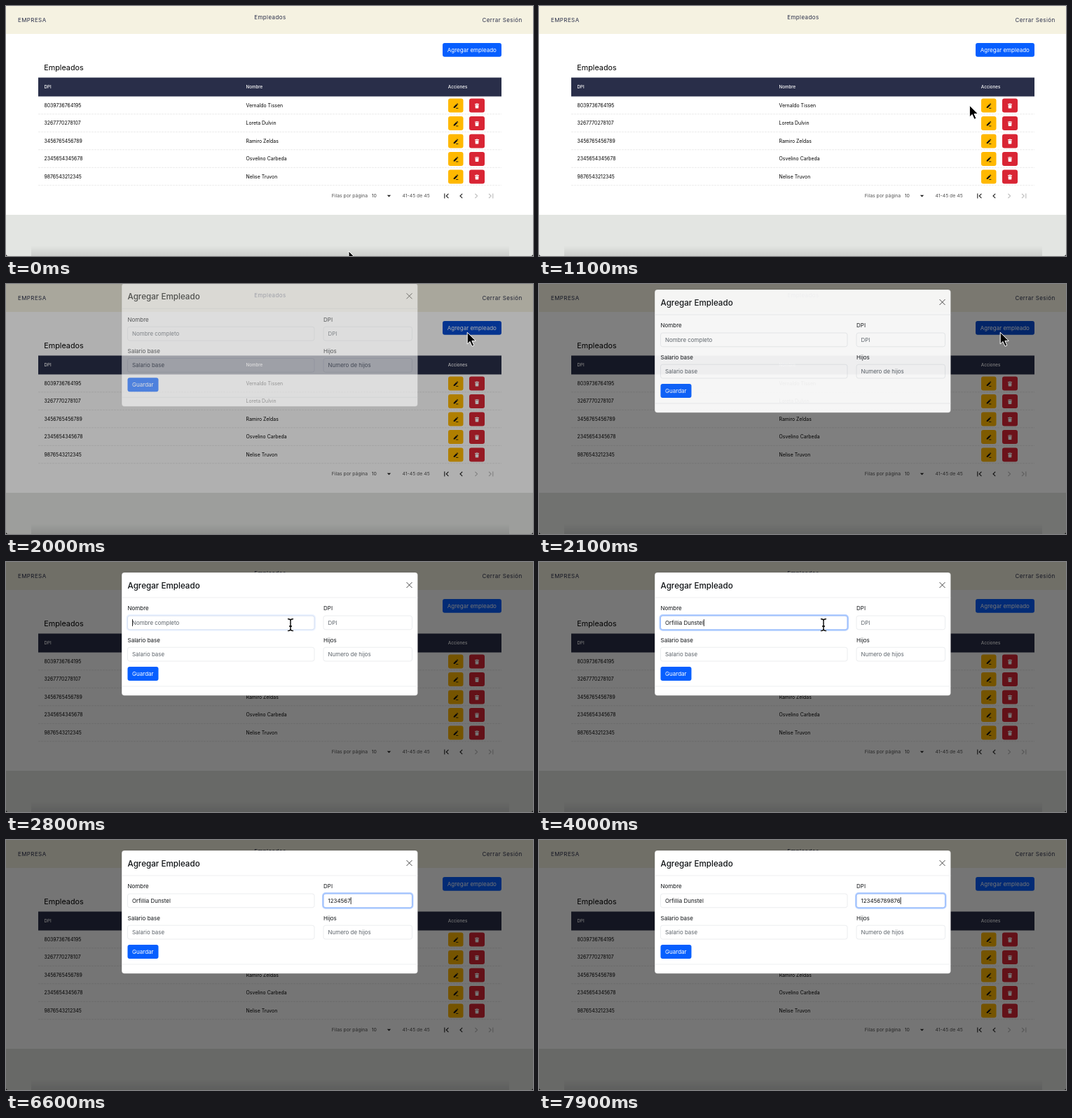
An HTML page for the animation above (8000 ms loop, 752 by 358 pixels).

```html
<!DOCTYPE html>
<html lang="es">
<head>
<meta charset="utf-8">
<title>Empleados</title>
<style>
  html, body { margin: 0; width: 100%; height: 100%; overflow: hidden; background: #fff; }
  svg { display: block; width: 752px; height: 358px; font-family: Inter, Roboto, sans-serif; }
  text { white-space: pre; }
</style>
</head>
<body>
<svg id="stage" viewBox="0 0 752 358"></svg>
<script>
const stage = document.getElementById('stage');
const LOOP = 8000;
const BLUE = '#075fff', INK = '#111417', HINT = '#5c636a';

// Text placed by its left edge and the middle of its capitals
const label = (x, y, str, size, fill = INK, extra = '') =>
  `<text x="${x}" y="${y + size * 0.36}" font-size="${size}" fill="${fill}" ${extra}>${str}</text>`;
const box = (x, y, w, h, fill, r = 0, extra = '') =>
  `<rect x="${x}" y="${y}" width="${w}" height="${h}" rx="${r}" fill="${fill}" ${extra}/>`;
const line = (d, stroke, width = 1, extra = '') =>
  `<path d="${d}" fill="none" stroke="${stroke}" stroke-width="${width}" ${extra}/>`;

const people = [
  ['8039736764195', 'Vernaldo Tissen'],
  ['3267770278107', 'Loreta Dulvin'],
  ['3456765456789', 'Ramiro Zeldas'],
  ['2345654345678', 'Osvelino Carbeda'],
  ['9876543212345', 'Nelise Truvon']
];

const row = ([dpi, name], i) => {
  const y = 142.5 + i * 25.5;
  return label(54.5, y, dpi, 6.9, '#000') + label(342.5, y, name, 6.9, '#000') +
    box(631, y - 10, 21.5, 20, '#ffb800', 3) + box(661, y - 10, 22, 20, '#d92534', 3) +
    `<g transform="translate(641.7 ${y + 0.5})">
      <path d="M-3 1.4L1 -2.6L2.6 -1L-1.4 3H-3zM1.4 -3L2.2 -3.7L3.6 -2.3L2.9 -1.5z" fill="#111"/>
      ${line('M0.4 3.4H3.6', '#111', 0.9)}</g>
    <g transform="translate(672 ${y + 0.5})" fill="#fff">
      <path d="M-3 -2.9H-1.2L-0.7 -3.5H0.7L1.2 -2.9H3V-2H-3zM-2.5 -1.5H2.5L2.2 3.5H-2.2z"/></g>` +
    line(`M46 ${y + 12.3}H707`, '#dedede', 0.6, 'stroke-dasharray="3 1"');
};

const spaced = 'letter-spacing=".4"';
const medium = 'font-weight="500"';
const page =
  box(0, 0, 752, 358, '#fff') +
  box(0, 0, 752, 40, '#f5f2e1') +
  label(17, 20.3, 'EMPRESA', 8, '#292e49', spaced) +
  label(354.2, 16.2, 'Empleados', 8, '#292e49', spaced) +
  label(679.5, 20.3, 'Cerrar Sesión', 8, '#292e49', spaced) +
  box(623, 53, 84, 19.7, BLUE, 3, 'id="add"') +
  label(629.8, 62.8, 'Agregar empleado', 8, '#fff') +
  label(54.3, 87.9, 'Empleados', 10.8, '#000') +
  box(46, 102.5, 661, 27, '#292e49') +
  label(54.5, 116, 'DPI', 6.2, '#fff', medium) +
  label(342.5, 116, 'Nombre', 6.2, '#fff', medium) +
  label(630.8, 116, 'Acciones', 6.2, '#fff', medium) +
  people.map(row).join('') +
  label(464.8, 272, 'Filas por página', 6.85, '#555') +
  label(521.8, 272, '10', 6.85, '#444') +
  '<path d="M543.8 270.8H549.2L546.5 273.6Z" fill="#222"/>' +
  label(565.5, 272, '41-45 de 45', 6.85, '#555') +
  line('M625.8 268.6V275.4M631.4 268.8L628.2 272L631.4 275.2M651.2 268.8L648 272L651.2 275.2', '#222', 1.1) +
  line('M669.4 268.8L672.6 272L669.4 275.2M689 268.8L692.2 272L689 275.2M694.8 268.6V275.4', '#bbb', 1.1) +
  box(0, 299, 752, 59, '#e3e5e2') +
  box(36, 343, 682, 15, 'url(#shade)') +
  '<path d="M0 355Q0 358 3 358H0ZM752 355Q752 358 749 358H752Z"/>';

const field = (id, x, y, w, title, hint) =>
  label(x, y - 10.5, title, 8) +
  box(x, y, w, 19.8, '#fff', 3, 'stroke="#e2e6e9" stroke-width=".7"') +
  `<g id="${id}Ring" opacity="0">${box(x - 1, y - 1, w + 2, 21.8, 'none', 4, 'stroke="#b4cfff" stroke-width="2"')}
    ${box(x, y, w, 19.8, 'none', 3, 'stroke="#86b0fe" stroke-width=".8"')}</g>` +
  label(x + 6.5, y + 10, hint, 7.95, HINT, `id="${id}"`);

const modal =
  box(165.1, 15, 422.4, 176.2, '#fff', 4, 'stroke="#000" stroke-opacity=".175" stroke-width=".6"') +
  label(173.5, 33.7, 'Agregar Empleado', 11.65, INK, medium) +
  line('M571.5 29L579.5 37M579.5 29L571.5 37', '#333', 0.9) +
  line('M165.5 51H587.5M165.5 178H587.5', '#e3e5e8', 0.6) +
  field('name', 173.5, 77, 266.5, 'Nombre', 'Nombre completo') +
  field('dpi', 453, 77, 126.5, 'DPI', 'DPI') +
  field('pay', 173.5, 122.2, 266.5, 'Salario base', 'Salario base') +
  field('kids', 453, 122.2, 126.5, 'Hijos', 'Numero de hijos') +
  box(173.5, 150, 44, 20, BLUE, 3) +
  label(180, 160, 'Guardar', 8.05, '#fff') +
  box(0, 82, 0.8, 10, '#000', 0, 'id="caret"');

stage.innerHTML =
  `<defs><linearGradient id="shade" x2="0" y2="1">
    <stop stop-opacity="0"/><stop offset="1" stop-opacity=".1"/></linearGradient></defs>` +
  page + box(0, 0, 752, 358, '#000', 0, 'id="dim"') + `<g id="modal">${modal}</g>` +
  `<path id="arrow" d="M0 0V16.8L3.8 13.2L6.8 20L9.6 18.8L6.7 12.2H12Z" stroke="#fff" stroke-width="1"/>
  <g id="beam">${['#fff', '#000'].map((c, i) =>
    line('M-4 -8.5Q0 -8.5 0 -6V6Q0 8.5 -4 8.5M4 -8.5Q0 -8.5 0 -6M0 6Q0 8.5 4 8.5M-2 2H2', c, i ? 1.4 : 2.6)).join('')}</g>`;

const el = {};
stage.querySelectorAll('[id]').forEach(n => el[n.id] = n);

const clamp = v => Math.max(0, Math.min(1, v));
const ramp = (t, from, to) => clamp((t - from) / (to - from));
const ease = p => p * p * (3 - 2 * p);
const mix = (a, b, p) => a + (b - a) * p;
const set = (n, attrs) => { for (const k in attrs) n.setAttribute(k, attrs[k]); };
const move = (n, x, y) => set(n, { transform: `translate(${x} ${y})` });

const DIGITS = '123456789876';
const keyTimes = [5200, 5400, 5600, 5800, 6100, 6300, 6600, 6900, 7100, 7400, 7600, 7900];

function fill(id, value, hint) {
  el[id].textContent = value || hint;
  set(el[id], { fill: value ? INK : HINT });
}

function draw(time) {
  const t = Math.floor(time / 100) * 100;

  const shown = t < 2000 ? 0 : ramp(t, 1840, 2120);
  set(el.dim, { opacity: 0.54 * shown });
  set(el.modal, { opacity: shown });
  move(el.modal, 0, -28 * (1 - ramp(t, 1900, 2300)) ** 2);
  set(el.add, { fill: t >= 1400 && t < 2400 ? '#064bd0' : BLUE });

  const up = ease(ramp(t, 500, 1400));
  const left = ramp(t, 2300, 2500);
  move(el.arrow, mix(mix(489, 658.2, up), 406, left), mix(mix(351, 69.2, up), 90, left));
  move(el.beam, 406, 90);
  set(el.arrow, { opacity: t < 2500 ? 1 : 0 });
  set(el.beam, { opacity: t >= 2500 && t < 4300 ? 1 : 0 });

  const toDpi = ramp(t, 4250, 4450);
  set(el.nameRing, { opacity: ramp(t, 2750, 2950) * (1 - toDpi) });
  set(el.dpiRing, { opacity: toDpi });

  const name = t >= 3800 ? 'Orfillia Dunstel' : '';
  const dpi = DIGITS.slice(0, keyTimes.filter(k => k <= t).length);
  fill('name', name, 'Nombre completo');
  fill('dpi', dpi, 'DPI');

  const [active, value] = t < 4300 ? [el.name, name] : [el.dpi, dpi];
  const end = value ? active.getComputedTextLength() : 0;
  const blink = t >= 3500 && t < 3800;
  set(el.caret, {
    x: +active.getAttribute('x') + end,
    opacity: t >= 2800 && !blink ? 1 : 0
  });
}

function tick() {
  draw(performance.now() % LOOP);
  requestAnimationFrame(tick);
}
tick();
</script>
</body>
</html>
```
